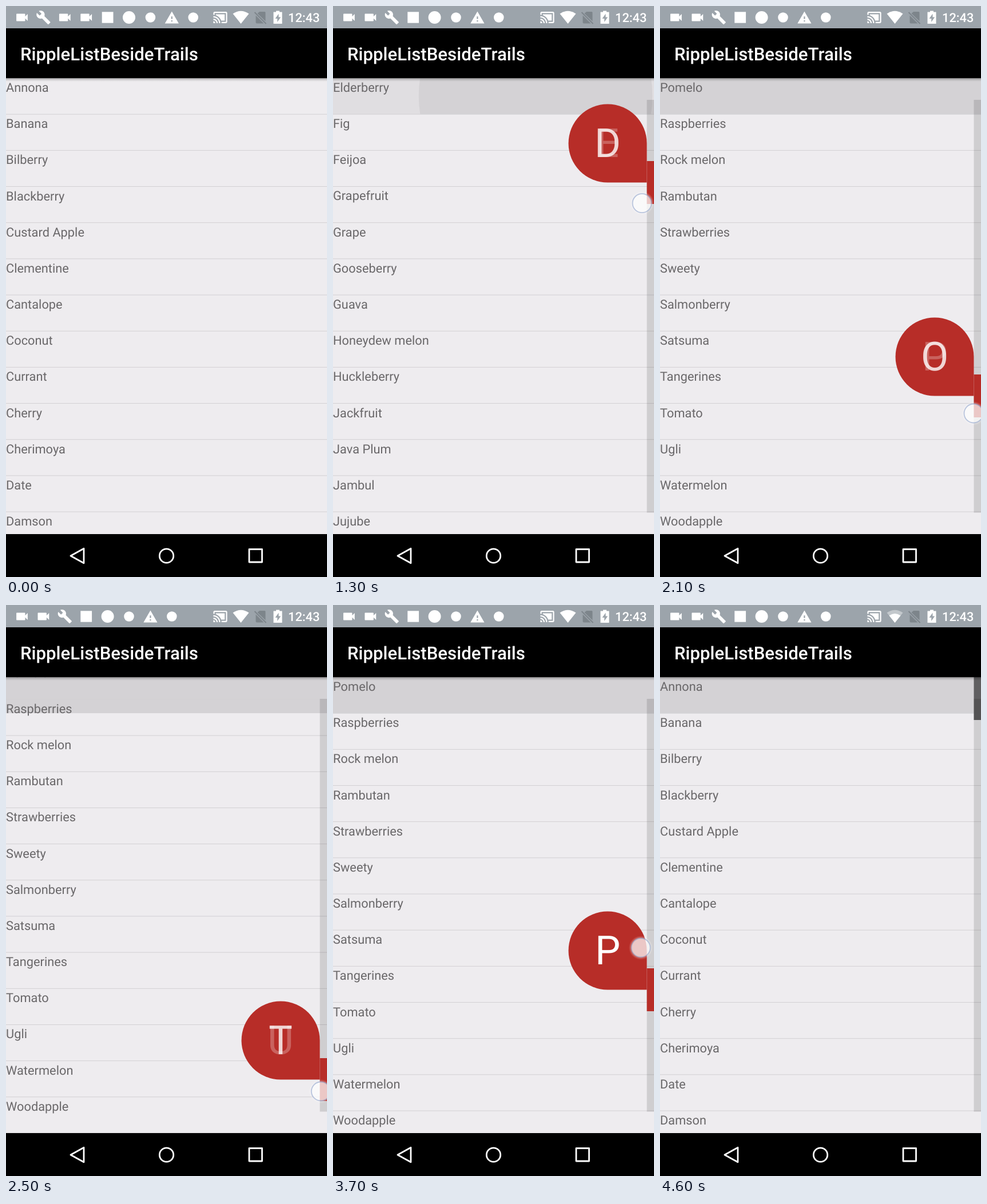
Write an HTML page that moves like this. It is 561 px wide and 998 px high and loops after 5100 ms.

```html
<!DOCTYPE html>
<html lang="en">
<head>
<meta charset="utf-8">
<title>Fast scroll list</title>
<style>
  html, body { margin: 0; width: 100%; height: 100%; overflow: hidden; background: #000; }
  svg { display: block; width: 100%; height: 100%; font-family: Roboto, sans-serif; text-rendering: geometricPrecision; }
</style>
</head>
<body>
<svg viewBox="0 0 561 998">
  <defs>
    <clipPath id="listClip"><rect y="126" width="561" height="797"/></clipPath>
    <clipPath id="rowClip"><rect y="126" width="561" height="63.2"/></clipPath>
    <linearGradient id="shade" x2="0" y2="1">
      <stop stop-color="#000" stop-opacity=".4"/>
      <stop offset=".4" stop-color="#000" stop-opacity=".14"/>
      <stop offset="1" stop-color="#000" stop-opacity="0"/>
    </linearGradient>
    <radialGradient id="glow">
      <stop offset=".72" stop-color="#fff" stop-opacity=".45"/>
      <stop offset="1" stop-color="#fff" stop-opacity="0"/>
    </radialGradient>
    <path id="camera" d="M17 10.5V7c0-.55-.45-1-1-1H4c-.55 0-1 .45-1 1v10c0 .55.45 1 1 1h12c.55 0 1-.45 1-1v-3.5l4 4v-11z"/>
    <path id="wrench" d="M22.7 19l-9.1-9.1c.9-2.3.4-5-1.5-6.9-2-2-5-2.4-7.4-1.3L9 6 6 9 1.6 4.7C.4 7.1.9 10.1 2.9 12.1c1.9 1.9 4.6 2.4 6.9 1.5l9.1 9.1c.4.4 1 .4 1.4 0l2.3-2.3c.5-.4.5-1.1.1-1.4z"/>
    <path id="square" d="M3 3.2h18v17.6H3z"/>
    <circle id="disc" cx="12" cy="12" r="10"/>
    <circle id="dot" cx="12" cy="12" r="8"/>
    <path id="warning" d="M1 21.5h22L12 2.5zm12-3h-2v-2h2zm0-4h-2v-4h2z"/>
  </defs>

  <rect y="126" width="561" height="797" fill="#eeecef"/>
  <g clip-path="url(#rowClip)">
    <rect id="press" y="126" width="561" height="63.2" opacity=".06"/>
    <circle id="ripple" cy="157" opacity=".055"/>
  </g>
  <g clip-path="url(#listClip)"><g id="rows" fill="#6a686a" font-size="21.82"></g></g>

  <rect id="idleThumb" x="548.5" y="126" width="12.5" height="75" fill="#605f61"/>
  <rect id="track" x="548.5" y="164" width="12.5" height="721.5" opacity=".13"/>
  <rect id="thumb" x="548.5" width="12.5" height="75" fill="#b72d28"/>
  <g id="bubble">
    <path d="M548.5 0H480a68.5 68.5 0 1 1 68.5 -68.5z" fill="#b72d28"/>
    <g fill="#fff" font-size="70" text-anchor="middle">
      <text id="oldLetter" x="480" y="-44.5"/>
      <text id="letter" x="480" y="-44.5"/>
    </g>
  </g>
  <rect y="126" width="561" height="6" fill="url(#shade)"/>
  <g id="touch">
    <circle r="21" fill="url(#glow)"/>
    <circle r="16.5" fill="#fff" fill-opacity=".52" stroke="#8fa3cb" stroke-opacity=".6" stroke-width="1.8"/>
  </g>

  <rect width="561" height="39" fill="#9ca4ab"/>
  <rect y="39" width="561" height="87"/>
  <text x="25" y="95" fill="#fff" font-size="31.2" font-weight="500">RippleListBesideTrails</text>
  <g id="notices" fill="#fff"></g>
  <g fill="#fff">
    <path transform="translate(361.3 6.8) scale(1.1)" d="M21 3H3c-1.1 0-2 .9-2 2v3h2V5h18v14h-7v2h7c1.1 0 2-.9 2-2V5c0-1.1-.9-2-2-2zM1 18v3h3c0-1.66-1.34-3-3-3zm0-4v2c2.76 0 5 2.24 5 5h2c0-3.87-3.13-7-7-7zm0-4v2c4.97 0 9 4.03 9 9h2c0-6.08-4.93-11-11-11zM19 7H5v1.63c3.96 1.28 7.09 4.41 8.37 8.37H19z"/>
    <path id="wifi" d="M410.5 31L396.5 13.5Q410.5 4 424.5 13.5z"/>
    <path id="wifiLow" d="M410.5 31L400.5 18.5Q410.5 11.5 420.5 18.5z"/>
    <g fill="#7d858b">
      <path d="M443 10h9q1.5 0 1.5 1.5v15L439.5 13zM436.5 16.5l14 14h-12q-2 0-2-2z"/>
      <path d="M434.5 11l20 20" fill="none" stroke="#7d858b" stroke-width="2"/>
    </g>
    <path d="M472 10.5V8.5h6v2h4.5v20.5h-15V10.5z"/>
    <path d="M476.5 13.5l-6 8.5h3.7v6l6-8.5h-3.7z" fill="#9ca4ab"/>
    <text x="493" y="28" font-size="21.82" font-weight="500">12:43</text>
  </g>

  <rect y="923" width="561" height="75"/>
  <g fill="none" stroke="#fff" stroke-width="2.8" stroke-linejoin="round">
    <path d="M113 961L136 948.2V973.8z"/>
    <circle cx="280.5" cy="961" r="12.2"/>
    <rect x="425" y="949.5" width="22.5" height="22.5"/>
  </g>
</svg>
<script>
const LOOP = 5100, STEP = 100, ROW = 63.17, TOP = 126, VIEW = 797;
const THUMB_MIN = 163.5, THUMB_MAX = 885.5;
const fruits = ('Annona,Banana,Bilberry,Blackberry,Custard Apple,Clementine,Cantalope,Coconut,Currant,Cherry,' +
  'Cherimoya,Date,Damson,Durian,Elderberry,Fig,Feijoa,Grapefruit,Grape,Gooseberry,Guava,Honeydew melon,' +
  'Huckleberry,Jackfruit,Java Plum,Jambul,Jujube,Kiwi,Kumquat,Lemons,Limes,Lychee,Mango,Mandarin,' +
  'Mangostine,Nectaraine,Orange,Olive,Prunes,Pears,Plum,Pineapple,Peach,Papaya,Passionfruit,Pomegranate,' +
  'Pomelo,Raspberries,Rock melon,Rambutan,Strawberries,Sweety,Salmonberry,Satsuma,Tangerines,Tomato,' +
  'Ugli,Watermelon,Woodapple').split(',');
const letters = [...new Set(fruits.map(name => name[0]))];
const starts = letters.map(c => fruits.findIndex(name => name[0] === c)).concat(fruits.length);
const maxScroll = fruits.length - VIEW / ROW;

// [time, drag height]; the finger runs one step ahead of the thumb
const dragKeys = [[600, 163.5], [800, 170], [900, 188.5], [1000, 200], [1600, 417], [1700, 448.5],
  [1800, 505], [2000, 640], [2100, 681.5], [2200, 712], [2400, 809], [2600, 850], [2900, 881],
  [3000, 885.5], [3100, 889], [3300, 882], [3400, 825], [3500, 757], [3600, 704], [3700, 672.5],
  [3800, 599], [4200, 285], [4300, 215], [4400, 163.5], [4500, 131]];
const touchXKeys = [[500, 548], [900, 547], [1700, 533], [2100, 548], [3000, 553], [3300, 550], [3700, 538], [4400, 540]];

const el = id => document.getElementById(id);
const clamp = (v, lo, hi) => Math.min(hi, Math.max(lo, v));
const set = (id, attrs) => { for (const k in attrs) el(id).setAttribute(k, attrs[k]); };
const show = (id, opacity) => set(id, { opacity: +opacity });

function track(keys, t) {
  if (t <= keys[0][0]) return keys[0][1];
  const i = keys.findIndex(k => k[0] >= t);
  if (i < 0) return keys[keys.length - 1][1];
  const [t0, v0] = keys[i - 1], [t1, v1] = keys[i];
  return v0 + (v1 - v0) * (t - t0) / (t1 - t0);
}

const thumbAt = t => clamp(track(dragKeys, t), THUMB_MIN, THUMB_MAX);
const fraction = t => (thumbAt(t) - THUMB_MIN) / (THUMB_MAX - THUMB_MIN);
const sectionAt = t => Math.min(letters.length - 1, Math.floor(fraction(t) * letters.length + 1e-6));

function scrollAt(t) {
  const exact = Math.min((fraction(t) + .04) * letters.length, letters.length - .01);
  const s = Math.floor(exact);
  const index = Math.floor(starts[s] + (exact - s) * (starts[s + 1] - starts[s]));
  return index > 47 ? maxScroll : Math.min(index, 46);
}

el('rows').innerHTML = fruits.map((name, i) => {
  const y = TOP + i * ROW;
  return `<text y="${y + 24}">${name}</text><rect y="${y + ROW - .5}" width="561" height="1" fill="#d2d0d3"/>`;
}).join('');

const iconRow = names => names.split(' ').map((name, i) =>
  `<use href="#${name}" transform="translate(${28 + i * 37.4 - 13.2} 6.8) scale(1.1)"/>`).join('');
const recording = iconRow('camera wrench camera camera square disc dot warning dot');
const settled = iconRow('camera camera wrench square disc dot warning dot');
let shownIcons = '';

function draw(time) {
  const t = Math.floor(time % LOOP / STEP) * STEP;
  const icons = t < 300 ? recording : settled;
  if (icons !== shownIcons) el('notices').innerHTML = shownIcons = icons;

  set('rows', { transform: `translate(0 ${-scrollAt(t) * ROW})` });
  const spread = clamp((t - 600) / 970, 0, 1);
  show('press', t < 700 ? 0 : .06 * clamp((t - 600) / 200, 0, 1));
  set('ripple', { cx: 546 - 266 * spread, r: 283 * spread });

  const y = thumbAt(t), held = t >= 600 && t < 4500;
  show('idleThumb', t >= 4500);
  show('track', t >= 600 ? .13 : 0);
  show('thumb', held);
  set('thumb', { y: y - 37.5 });

  show('bubble', t < 700 || t >= 4600 ? 0 : t === 700 || t === 4500 ? .5 : 1);
  set('bubble', { transform: `translate(0 ${Math.max(263.5, y)})` });
  const now = sectionAt(t), before = sectionAt(t - STEP), fading = now !== before;
  el('letter').textContent = letters[now];
  el('oldLetter').textContent = letters[before];
  show('letter', fading ? .25 : 1);
  show('oldLetter', fading ? .8 : 0);

  show('touch', t >= 500 && t < 4500);
  set('touch', { transform: `translate(${track(touchXKeys, t)} ${track(dragKeys, t + STEP)})` });

  const weak = t >= 4200;
  show('wifi', weak ? .4 : 1);
  show('wifiLow', weak);
}

const begin = performance.now();
function tick() {
  draw(performance.now() - begin);
  requestAnimationFrame(tick);
}
tick();
</script>
</body>
</html>
```
